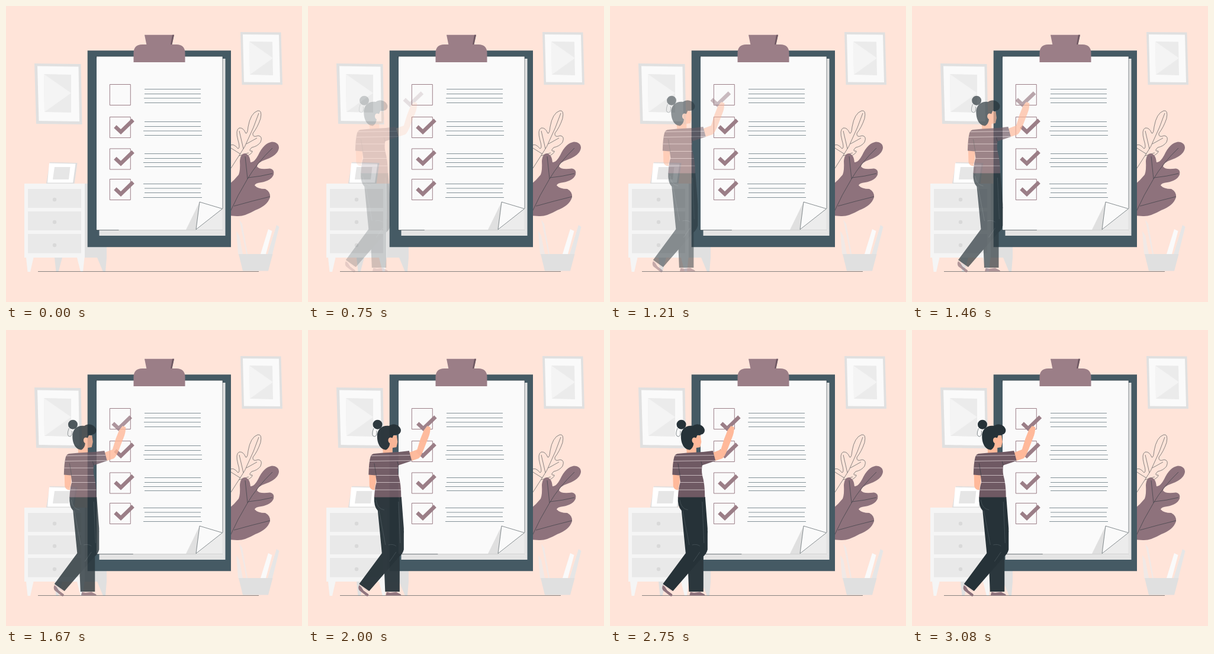
An HTML page that plays this animation: 500x500 px, repeating every 3120 ms.

```html
<!DOCTYPE html>
<html>
<head>
<meta charset="utf-8">
<title>Checklist</title>
<style>
html, body { margin: 0; height: 100%; overflow: hidden; background: #ffe4d9; }
svg { display: block; width: 100vw; height: 100vh; }
.ink { fill: none; stroke: #263238; stroke-width: .55; }
.box { fill: none; stroke: #9b7e87; stroke-width: 1; }
.rule { fill: none; stroke: #455a64; stroke-width: .65; }
.tick { fill: none; stroke: #9b7e87; stroke-width: 6.4; }
</style>
</head>
<body>
<svg viewBox="0 0 500 500">
  <defs>
    <path id="tick" class="tick" d="M184.4 203.6L194 212.6L214.6 192.6"/>
    <path id="shirt" d="M112 209L128 207.500L155 206L172 204L176.500 221L154 228.500Q152.500 238 154 245Q158.500 260 158.500 282.500H113Q114 265 117 257L115.500 245.500L103.500 244.500Q104 224 106.500 215Q108 210 112 209Z"/>
    <clipPath id="shirtClip"><use href="#shirt"/></clipPath>
  </defs>

  <!-- wall frames -->
  <path fill="#e0e0e0" d="M48 97L126.500 98L128.500 200L51 199ZM396 44L464.500 44.500L467 133L398.500 133Z"/>
  <path fill="#fafafa" d="M53 101.500L122.500 102.500L124 195L55.500 194ZM400 48L461 48.500L463 129L402 128.500Z"/>
  <path fill="#ebebeb" d="M64 115L110 116L110 180L65 179ZM411 60L450 60.500L451 117L412 116Z"/>
  <path fill="#f4f4f4" d="M64 115L110 147L65 179ZM411 60L451 88L412 116Z"/>

  <!-- dresser -->
  <path fill="#e0e0e0" d="M133 300H170V425H133ZM82 425H95L88.500 449H84.500ZM154 425H170L168 449H164Z"/>
  <path fill="#f5f5f5" d="M31 300H133V425H31ZM34 425H46.500L41 449H36.500ZM120 425H132.500L130 449H126Z"/>
  <path fill="#e9e9e9" d="M37 309H127V341H37ZM37 347H127V379H37ZM37 385H127V417.500H37Z"/>
  <g fill="#d9d9d9"><circle cx="82" cy="327" r="3.200"/><circle cx="82" cy="365" r="3.200"/><circle cx="82" cy="404" r="3.200"/></g>
  <path fill="#dedede" d="M74 264L120.500 265L115.500 300H68Z"/>
  <path fill="#fff" d="M73 265.500L117.500 266.500L113 298.500H70Z"/>
  <path fill="#e6e6e6" d="M82 272H108.500L106 293H79Z"/>

  <!-- plant -->
  <path class="ink" d="M378 236Q384 231 392 241Q396 240 392 227Q387 209 394 206Q401 205 405 215Q408 216 409 204Q413 181 425 177Q433 175 430 190Q425 205 417 215Q416 223 426 219Q434 220 430 230Q425 237 415 239Q408 246 416 245Q417 249 404 255M380 274L403 238L418 205L427 181M401 241L394 211M406 233L424 223M396 250L380 240M394 253L410 248"/>
  <path fill="#8e727c" d="M376 354V302Q386 294 393 285Q396 278 395 262Q396 249 404 249Q412 251 413 264Q419 265 426 252Q435 232 449 229.500Q461 230 461 240Q459 252 440 259Q425 264 424 271Q427 277 446 274.500Q454 276 452 285Q448 295 431 298Q421 299 420 303Q425 309 438 309Q447 314 446 323Q442 337 421 345Q402 356 390 355Z"/>
  <path class="ink" d="M379 347Q391 320 408 292Q424 265 450 240M408 292L404 254M409 290Q430 288 450 283M385 338Q417 329 446 322"/>

  <!-- pencil pot -->
  <path fill="#f1e9e6" d="M389 380L394 388L400 419H392ZM394 361L399 368L408 419H406L396 370Z"/>
  <path fill="#fafafa" d="M443 377L449.500 380L439 419H430Z"/>
  <path fill="#e6e6e6" d="M457 370L461.500 373L450 419H442Z"/>
  <path fill="#e0e0e0" d="M393 419H450.500L443 447.500H400Z"/>
  <path class="ink" d="M54 448.500H427"/>

  <!-- clipboard -->
  <path fill="#455a64" d="M137.700 75.300H380V407.300H137.700Z"/>
  <path fill="#e4e4e4" d="M157.500 89H370.500V388H157.500Z"/>
  <path fill="#ececec" d="M321 378L365 342V380H321Z"/>
  <path fill="#fafafa" d="M153 85H366V342L321 378.500H153Z"/>
  <path class="ink" d="M152.500 88V85.200H366V342"/>
  <path stroke="#bdbdbd" stroke-width=".6" d="M153 378.500H366"/>
  <path id="edge" class="ink"/>
  <path fill="#e0e0e0" d="M327 331L304 378H321Z"/>
  <path class="ink" style="fill:#fafafa" d="M327 331L365.500 342.500L321 377.500Z"/>
  <path fill="#9b7e87" d="M234 48.700H284L280 66H237.500ZM215.500 95V79Q216 65 230 65H288Q302 65 302.500 79V95Z"/>
  <path fill="#6f5963" d="M281 48.700H284L280.500 65H278Z"/>

  <!-- list -->
  <path class="box" d="M175.300 132.500h35v35h-35ZM175.300 187.500h35v35h-35ZM175.300 241h35v35h-35ZM175.300 292.500h35v35h-35Z"/>
  <use href="#tick"/><use href="#tick" y="53.500"/><use href="#tick" y="105"/>
  <path class="rule" d="M234 140.500H329M234 148.500H329M233 155.800H329M234 163.500H329M234 195.500H329M234 203.500H329M232 211H331M234 218.500H331M234 249.500H329M234 257.500H331M232 264.500H331M234 271.500H329M232 300.500H331M234 308H329M234 315.500H329M232 323.500H331"/>

  <g id="person">
    <use href="#tick" x="2" y="-46"/>
    <!-- arms, neck and face -->
    <path fill="#ffb99a" d="M172 207L185.500 202L191 184L197 169L202.500 162L208 164Q208 174 204 183L197 201Q192 214 188 217L176 221Z"/>
    <path fill="#ffb99a" d="M104.500 244H116.500L115.500 259Q113.500 266 114 270Q107 271 105 264Z"/>
    <path fill="#ffb99a" d="M127 196L136 178H151L152.500 189L150.500 198L144 199V207L128 209Z"/>
    <!-- hair -->
    <circle cx="118.700" cy="159.700" r="8" fill="#263238"/>
    <path class="ink" d="M112 166Q107 180 114 180Q118 179 117 170"/>
    <path fill="#263238" d="M118 180C117 168 127 160 138 162C146 156 156 161 158 168C159 175 153 178 146 177L143.500 182.500Q139 180 137 184Q135.500 189 139.500 191.500Q139 199 133 202.500C123 202 118 191 118 180Z"/>
    <!-- shoes -->
    <path fill="#ecd5d0" d="M91 427L105 437L102 442L88 432ZM135 440H152V444H135Z"/>
    <path fill="#8e727c" d="M87.500 431L91 434L95 440L103 446Q105 449 101 450L88 440Q85 436 87.500 431ZM134 442.500L140 444L150 442.500L157 446Q160 448 157 448.500H132.500Z"/>
    <!-- trousers -->
    <path fill="#2b373d" d="M120 305L163 340L156 378V442H131.500L130 405L126 370Z"/>
    <path fill="#263238" d="M113 282H159L163 335V371Q161 379 154 384L104.500 441L87.500 429L126 377L119 305Q112 298 113 282Z"/>
    <path fill="none" stroke="#5b676d" stroke-width=".5" d="M121 305L132 363M137 363Q145 361 150 365M116 287Q118 302 130 304M154 290L157 360M150 375L139 391"/>
    <use href="#shirt" fill="#6f5963"/>
    <path clip-path="url(#shirtClip)" fill="none" stroke="#dccfd2" stroke-width=".8" d="M108 212.500L174 211.500M104 221.500L178 220.500M103 233H157M115 245.500H160M112 257.500H160M112 270H160"/>
    <path class="ink" d="M113 225L116.500 246M154 229L152 222"/>
  </g>
</svg>
<script>
const LOOP = 3120, SLIDE = 30;
const person = document.getElementById('person');
const edge = document.getElementById('edge');

const bezier = (a, b, s) => 3 * (1 - s) ** 2 * s * a + 3 * (1 - s) * s * s * b + s ** 3;

// Slow start, slight overshoot, then settle
function ease(x) {
  let lo = 0, hi = 1;
  for (let i = 0; i < 24; i++) {
    const mid = (lo + hi) / 2;
    if (bezier(.36, .5, mid) < x) lo = mid; else hi = mid;
  }
  return bezier(-.01, 1.38, lo);
}

function draw() {
  const p = ease(performance.now() % LOOP / LOOP);
  const dx = SLIDE * (p - 1);
  person.setAttribute('transform', `translate(${dx} 0)`);
  person.setAttribute('opacity', Math.min(1, Math.max(0, p)));
  edge.setAttribute('d', `M152 378.500H${220.5 + dx}`);
  requestAnimationFrame(draw);
}
draw();
</script>
</body>
</html>
```
